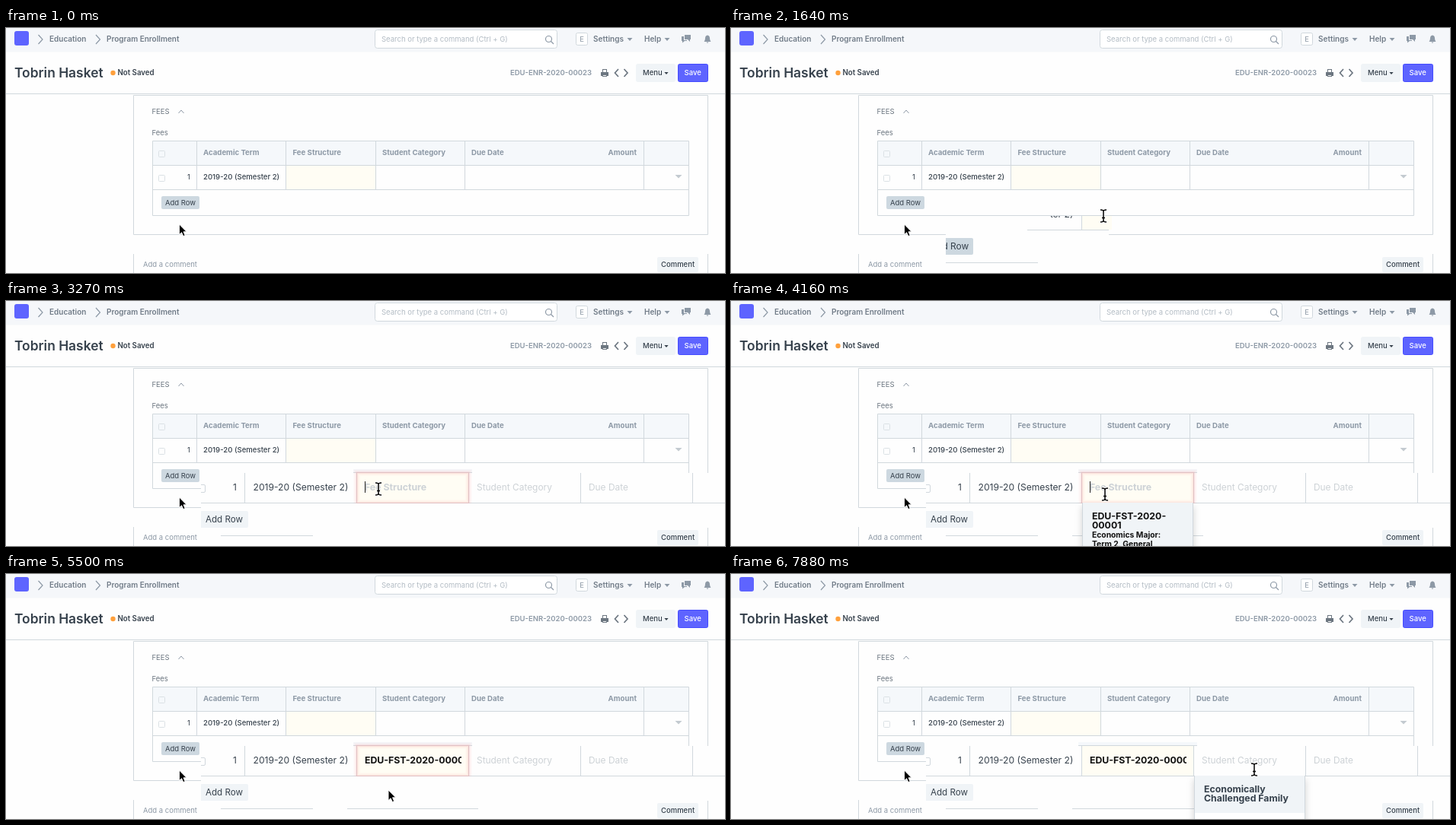
Animation of 944 by 322 pixels, one loop 8000 ms. Source, as an HTML page:

```html
<!DOCTYPE html>
<html lang="en">
<head>
<meta charset="utf-8">
<title>Program Enrollment</title>
<style>
html, body { margin: 0; width: 100%; height: 100%; overflow: hidden; background: #fefefe; }
svg { display: block; width: 944px; height: 322px; }
text { font: 9.5px Inter, "Open Sans", sans-serif; fill: #36414c; white-space: pre; }
.sb { font-weight: 600; }
.b { font-weight: 700; }
.md { font-weight: 500; }
.mut { fill: #8d99a6; }
.dim { fill: #6c7680; }
.find { fill: #b3bcc4; }
.nav { font-size: 10px; font-weight: 600; fill: #717c88; }
.th { font-size: 9.65px; font-weight: 700; fill: #8d99a6; }
.title { font-size: 17.4px; font-weight: 600; }
.mid { text-anchor: middle; }
.end { text-anchor: end; }
.z { font-size: 11.9px; }
.z.b { font-size: 12.3px; }
.blk { fill: #111; }
.inv { fill: #fff; }
.ph { fill: #cdd2d6; }
.small { font-size: 10.3px; }
.line { fill: none; stroke: #d1d8dd; }
.box { fill: #fff; stroke: #d1d8dd; }
.check { fill: none; stroke: #dbe1e5; }
.ico { fill: none; stroke: #8d99a6; stroke-width: 1.2; }
.solid { fill: #8d99a6; }
.btn { fill: #f0f4f7; }
.hover { fill: #cdd8e0; }
.head { fill: #f5f8fb; }
.must { fill: #fffdf4; }
.w { fill: #fefefe; }
.caret { stroke: #222; }

/* every layer holds its state until the next key; 1% = 80 ms */
.t { visibility: hidden; animation: 8s step-end infinite; }
.patch1 { animation-name: patch1; }
.patch2 { animation-name: patch2; }
.patch3 { animation-name: patch3; }
.patch4 { animation-name: patch4; }
.row { animation-name: row; }
.hint { animation-name: hint; }
.value { animation-name: value; }
.strip { animation-name: strip; }
.caret1 { animation-name: caret1; }
.caret2 { animation-name: caret2; }
.under { animation-name: under; }
.menu1 { animation-name: menu1; }
.menu2 { animation-name: menu2; }
.arrow { animation-name: arrow; }
.beam { animation-name: beam; }
.hand { animation-name: hand; }
.glow { opacity: 0; animation: glow 8s step-end infinite; }
.pointer { animation: move 8s step-end infinite; }

@keyframes patch1 { 5.625% { visibility: visible } }
@keyframes patch2 { 7.5% { visibility: visible } }
@keyframes patch3 { 11.25% { visibility: visible } }
@keyframes patch4 { 13.125% { visibility: visible } }
@keyframes row { 22.375% { visibility: visible } }
@keyframes hint { 22.375% { visibility: visible } 68.75% { visibility: hidden } }
@keyframes value { 68.75% { visibility: visible } }
@keyframes strip { 27.875% { visibility: visible } }
@keyframes under { 46.5% { visibility: visible } }
@keyframes menu1 { 46.5% { visibility: visible } 68.75% { visibility: hidden } }
@keyframes menu2 { 98.5% { visibility: visible } }
@keyframes caret1 {
  27.875%, 40.875%, 52%, 65% { visibility: visible }
  33.5%, 46.5%, 59.375%, 68.75% { visibility: hidden }
}
@keyframes caret2 {
  79.75%, 92.875% { visibility: visible }
  85.375%, 98.5% { visibility: hidden }
}
@keyframes glow { 27.875% { opacity: .5 } 29.75% { opacity: 1 } 79.75% { opacity: 0 } }
@keyframes arrow {
  5.625%, 68.75% { visibility: visible }
  13.125%, 74.25% { visibility: hidden }
}
@keyframes beam {
  13.125%, 74.25% { visibility: visible }
  53.875% { visibility: hidden }
}
@keyframes hand { 53.875% { visibility: visible } 68.75% { visibility: hidden } }
@keyframes move {
  5.625% { transform: translate(391px, 281px) }
  7.5% { transform: translate(426px, 266px) }
  11.25% { transform: translate(484px, 266px) }
  13.125% { transform: translate(493px, 256px) }
  20.5% { transform: translate(489px, 247px) }
  52% { transform: translate(491px, 254px) }
  53.875% { transform: translate(496px, 268px) }
  55.625% { transform: translate(500px, 278px) }
  57.625% { transform: translate(501px, 282px) }
  68.75% { transform: translate(502px, 284px) }
  72.375% { transform: translate(565px, 275px) }
  74.25% { transform: translate(660px, 261px) }
  76.125% { transform: translate(687px, 257px) }
}
</style>
</head>
<body>
<svg viewBox="0 0 944 322">
  <defs>
    <path id="tip" d="M0 0V13.6L3.1 10.7L5.3 15.6L7.6 14.6L5.5 9.8H9.6Z" fill="#000" stroke="#fff" stroke-width=".9"/>
    <path id="bar" d="M-4-8Q0-8 0-6V6Q0 8-4 8M4-8Q0-8 0-6M0 6Q0 8 4 8M-2 2.5H2" fill="none"/>
    <path id="down" d="M-3.5-2H3.5L0 2Z"/>
    <rect id="focus" x="460.5" y="225.5" width="147" height="40"/>
    <g id="cells">
      <path class="must" d="M461 226H607V265H461Z"/>
      <path class="line" d="M256 265.5H944M313.5 226V265M460.5 226V265M607.5 226V265M754.5 226V265M901.5 226V265"/>
      <text class="z" x="324.5" y="249" style="font-size:12.1px">2019-20 (Semester 2)</text>
    </g>
    <g id="zoomed">
      <rect class="w" x="256" y="226" width="688" height="96"/>
      <use href="#cells"/>
      <rect class="hover" x="255" y="276" width="63" height="22" rx="2"/>
      <text class="z" x="262" y="291">Add Row</text>
      <path class="line" d="M256 308.5H944"/>
    </g>
    <clipPath id="c1"><rect x="282" y="266" width="121" height="43"/></clipPath>
    <clipPath id="c2"><rect x="389" y="265" width="48" height="37"/></clipPath>
    <clipPath id="c3"><rect x="420" y="247" width="76" height="36"/></clipPath>
    <clipPath id="c4"><rect x="484" y="247" width="16" height="18"/></clipPath>
    <clipPath id="rowClip"><rect x="256" y="226" width="688" height="72"/></clipPath>
    <clipPath id="glowClip"><rect x="456" y="221" width="156" height="45"/></clipPath>
    <clipPath id="valueClip"><rect x="470" y="230" width="128" height="30"/></clipPath>
    <clipPath id="below"><rect x="440" y="265" width="340" height="57"/></clipPath>
    <filter id="shade" x="-20%" y="-20%" width="140%" height="150%">
      <feDropShadow dx="0" dy="6" stdDeviation="5" flood-color="#000" flood-opacity=".18"/>
    </filter>
  </defs>

  <!-- top bar -->
  <rect width="944" height="31.5" fill="#f5f7fa"/>
  <rect x="11" y="4" width="19" height="19" rx="3" fill="#5e64ff"/>
  <path class="ico" d="M42.5 9L48 15L42.5 21M118 9L123.500 15L118 21"/>
  <text class="nav" x="57" y="18">Education</text>
  <text class="nav" x="132" y="18">Program Enrollment</text>
  <rect class="box" x="484.5" y="2.5" width="239" height="24" rx="3"/>
  <text class="find" x="493" y="18">Search or type a command (Ctrl + G)</text>
  <path class="ico" d="M708.5 14.5A4 4 0 1 1 716.5 14.5A4 4 0 1 1 708.5 14.5M715.5 17.5L719 21"/>
  <rect class="box" x="748.5" y="6.5" width="15" height="16" rx="2"/>
  <text class="mut mid" x="756" y="18">E</text>
  <text class="nav" x="771" y="18">Settings</text>
  <text class="nav" x="838" y="18">Help</text>
  <g class="solid">
    <use href="#down" x="819" y="15"/>
    <use href="#down" x="868" y="15"/>
    <path d="M891 9H899V15H898V18L895 15H891Z"/>
    <path d="M887 11H890V16H894V17H891L888 19.5V17H887Z"/>
    <path d="M916.5 18Q918 16 918 13.5Q918 10 921 9.5Q924 10 924 13.5Q924 16 925.5 18ZM919.5 18.5H922.5L921 20Z"/>
  </g>

  <!-- page head -->
  <text class="title" x="11" y="65">Tobrin Hasket</text>
  <circle cx="140.5" cy="59" r="3.2" fill="#ffa03c"/>
  <text class="sb" x="146.5" y="62" style="font-size:9.7px">Not Saved</text>
  <text class="mut sb" x="662" y="62">EDU-ENR-2020-00023</text>
  <path class="dim" fill-rule="evenodd" d="M783 54H789V58H783ZM784 55V58H788V55ZM781 58H791V63H789V61H783V63H781ZM783 61H789V64H783ZM784 62V63H788V62Z"/>
  <path class="ico" style="stroke:#6c7680;stroke-width:1.7" d="M804 54L799.5 59L804 64M811.5 54L816 59L811.5 64"/>
  <rect class="btn" x="827" y="47" width="52" height="24" rx="3"/>
  <text class="md" x="836" y="62">Menu</text>
  <use href="#down" transform="translate(867 59.5) scale(.75)" fill="#36414c"/>
  <rect x="882.5" y="47.5" width="39" height="23" rx="2" fill="#5e64ff" stroke="#444bff"/>
  <text class="md inv" x="890.5" y="62">Save</text>
  <path class="line" d="M0 86.5H944"/>

  <!-- form -->
  <path class="line" d="M167.5 88.5H921.5V271.5H167.5Z"/>
  <text class="dim" x="191.5" y="113">FEES</text>
  <path class="ico" style="stroke-width:1" d="M226.5 112L230 108L233.5 112"/>
  <text class="dim" x="191.5" y="140.5">Fees</text>
  <rect class="head" x="192" y="149" width="705" height="31"/>
  <rect class="must" x="368" y="181" width="117" height="31"/>
  <path class="line" d="M192.5 148.5H896.5V246.5H192.5ZM192.5 180.5H896.5M192.5 212.5H896.5M250.5 149V212M367.5 149V212M485.5 149V212M602.5 149V212M837.5 149V212"/>
  <rect class="check" x="200.5" y="161.5" width="8" height="8" rx="1"/>
  <rect class="check" x="200.5" y="193.5" width="8" height="8" rx="1"/>
  <text class="th" x="259" y="167">Academic Term</text>
  <text class="th" x="376.5" y="167">Fee Structure</text>
  <text class="th" x="494" y="167">Student Category</text>
  <text class="th" x="611" y="167">Due Date</text>
  <text class="th end" x="828" y="167">Amount</text>
  <text class="mid" x="240" y="199">1</text>
  <text class="md" x="259" y="199" style="font-size:9.6px">2019-20 (Semester 2)</text>
  <path d="M878.5 193H887.5L883 197.5Z" fill="#c3cad0"/>
  <rect class="hover" x="204" y="221" width="50" height="17" rx="2"/>
  <text x="209" y="233">Add Row</text>

  <!-- comment box -->
  <path class="line" d="M167.5 322V297M921.5 297V322"/>
  <text class="mut" x="180" y="314">Add a comment</text>
  <rect class="btn" x="855" y="301" width="54" height="20" rx="2"/>
  <text class="md" x="860" y="314">Comment</text>
  <use href="#tip" x="227.5" y="258"/>

  <!-- enlarged view, uncovered piece by piece -->
  <g class="t patch1" clip-path="url(#c1)"><use href="#zoomed"/></g>
  <g class="t patch2" clip-path="url(#c2)"><use href="#zoomed"/></g>
  <g class="t patch3" clip-path="url(#c3)"><use href="#zoomed"/></g>
  <g class="t patch4" clip-path="url(#c4)"><use href="#zoomed"/></g>

  <g class="t row" clip-path="url(#rowClip)">
    <rect class="w" x="256" y="226" width="688" height="72"/>
    <use href="#cells"/>
    <rect class="line" x="251.5" y="241.5" width="10" height="10" rx="1.5"/>
    <text class="z mid" x="300.5" y="249">1</text>
    <text class="z ph" x="618" y="249">Student Category</text>
    <text class="z ph" x="765" y="249">Due Date</text>
    <rect class="btn" x="255" y="276" width="63" height="22" rx="2"/>
    <text class="z" x="262" y="291" style="font-size:11.6px">Add Row</text>
  </g>
  <g class="t strip">
    <rect class="head" x="456" y="221" width="156" height="4"/>
    <path class="line" d="M456 225.5H612"/>
  </g>
  <g class="glow" clip-path="url(#glowClip)" fill="none" stroke="#f5a0a0">
    <use href="#focus" stroke-width="8" opacity=".07"/>
    <use href="#focus" stroke-width="5" opacity=".09"/>
    <use href="#focus" stroke-width="2.5" opacity=".14"/>
    <use href="#focus" opacity=".2"/>
  </g>
  <text class="t hint z b ph" x="471" y="249">Fee Structure</text>
  <g clip-path="url(#valueClip)"><text class="t value z b blk" x="471" y="249">EDU-FST-2020-00001</text></g>
  <path class="t caret caret1" d="M471.5 237V252"/>
  <path class="t caret caret2" d="M618.5 237V252"/>

  <!-- suggestion lists -->
  <g class="t under">
    <rect class="w" x="448" y="266" width="172" height="56"/>
    <path class="line" d="M448 308.5H620"/>
  </g>
  <g class="t menu1" clip-path="url(#below)">
    <rect class="line" style="fill:#f0f4f7" x="461.5" y="264.5" width="145" height="80" filter="url(#shade)"/>
    <text class="z b blk" x="474" y="287">EDU-FST-2020-</text>
    <text class="z b blk" x="474" y="299">00001</text>
    <text class="small b blk" x="474" y="311">Economics Major:</text>
    <text class="small b blk" x="474" y="323">Term 2, General</text>
  </g>
  <g class="t menu2" clip-path="url(#below)">
    <rect class="box" x="608.5" y="264.5" width="145" height="80" filter="url(#shade)"/>
    <rect class="btn" x="609" y="265" width="144" height="49"/>
    <text class="z b" x="621" y="287">Economically</text>
    <text class="z b" x="621" y="299">Challenged Family</text>
  </g>

  <g class="pointer">
    <use class="t arrow" href="#tip"/>
    <g class="t beam">
      <use href="#bar" stroke="#fff" stroke-width="3"/>
      <use href="#bar" stroke="#000" stroke-width="1.5"/>
    </g>
    <path class="t hand" fill="#fff" stroke="#000" stroke-width="1.1" stroke-linejoin="round"
      d="M-1.5 9V.8Q-1.5-.7 0-.7T1.5.8V5.5Q2.5 4.3 4 5.8Q5.5 4.8 6.300 6.5Q8 6 8 8V11Q7.5 13 6.500 15H-.5Q-2 12-5 9Q-4.5 6.5-1.5 9ZM1.5 5.5V8M4 6V8.5M6.3 6.5V8.5"/>
  </g>
</svg>
</body>
</html>
```
